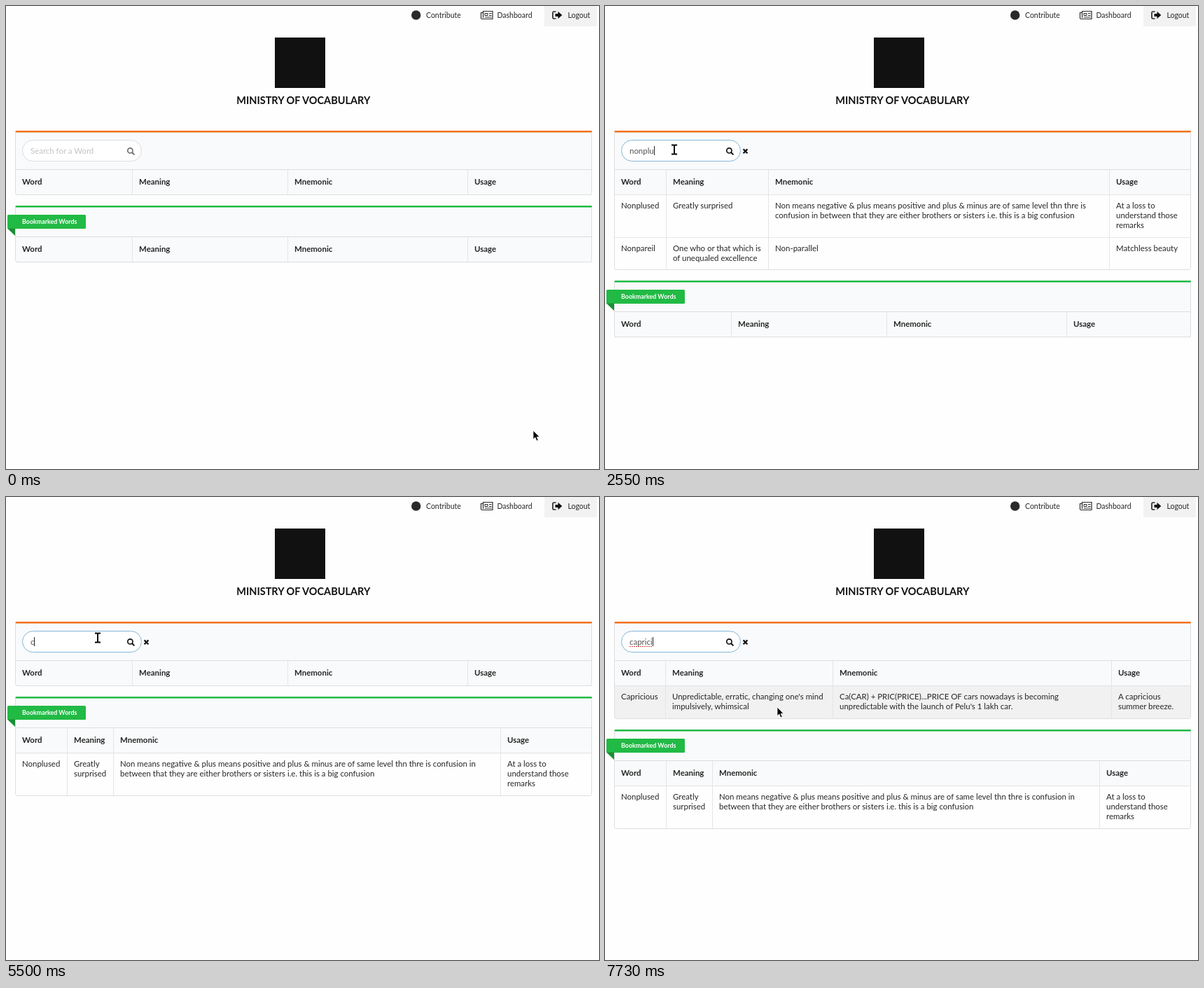
Write an HTML page that moves like this. It is 847x661 px and loops after 8000 ms.

```html
<!DOCTYPE html>
<html lang="en">
<head>
<meta charset="utf-8">
<title>Vocabulary search</title>
<style>
html, body { margin: 0; width: 100%; height: 100%; overflow: hidden; background: #fefefe; }
svg { display: block; width: 100%; height: 100%; }
text { font-family: Lato, "Open Sans", sans-serif; font-size: 11.45px; fill: #262626; white-space: pre; }
.b { font-weight: 700; }
.nav { font-size: 10.5px; }
.ribbon { font-size: 8.9px; font-weight: 700; fill: #fff; }
.title { font-size: 14.5px; font-weight: 700; fill: #111; text-anchor: middle; }
</style>
</head>
<body>
<svg viewBox="0 0 847 661">
  <g id="page"></g>
  <g id="field">
    <rect id="pill" x="23.5" y="191.5" width="170" height="30" rx="15" fill="#fff"/>
    <text id="query" x="35" y="211"></text>
    <path id="squiggle" d="M35 213.5H68" stroke="#d8453c" stroke-dasharray="2 1" fill="none"/>
    <rect id="caret" y="200" width="1" height="13" fill="#222"/>
    <g id="lens" fill="none" stroke="#111" stroke-width="1.7">
      <circle cx="177.4" cy="206.4" r="3.6"/><path d="M180 209L183.4 212.4" stroke-width="2"/>
    </g>
    <path id="clear" d="M197.6 204.4L203.4 210.2M203.4 204.4L197.6 210.2" stroke="#111" stroke-width="2.2"/>
  </g>
  <g id="pointer">
    <circle id="glow" cx="1" cy="1" r="9" fill="#fbf04a" fill-opacity=".8"/>
    <path id="arrow" d="M0 0V12.6L2.9 9.9L4.9 14.8L7.2 13.9L5.2 9.2H9Z" fill="#000" stroke="#fff" stroke-width=".8"/>
    <path id="beam" d="M-4-6.5H-1L0-5.5L1-6.5H4M0-6V6M-4 6.5H-1L0 5.5L1 6.5H4" fill="none" stroke="#000" stroke-width="1.9"/>
  </g>
</svg>
<script>
const LOOP = 8000;
const $ = id => document.getElementById(id);
const HEADS = ["Word", "Meaning", "Mnemonic", "Usage"];

// Cells are split by "#", lines inside a cell by "|".
const rows = s => s.trim().split("\n").map(r => r.split("#").map(c => c.trim().split("|")));

const nRows = rows(`
Necrology#A list of persons who have died in a certain|place or time##
Nectarine#A variety of the peach##
Nestling#Recently hatched##She writes books for children
Non|Sequitur#A conclusion that does not follow from the|facts stated, irrelevant reply##
Nuance#A slight degree of difference in anything|perceptible to the sense of the mind#Nuance = new + ounce.. and ounce is a very small unit|for weight.. hence a very small difference..#Without understanding the finer|nuances you can't enjoy the humor
Neural#Pertaining to the nerves or nervous system##Nervous disease
Nihilism#No right or wrong ; the delusion that|everything is unreal#A NIHILISTIC person might choose to ANNIHILATE the|world.#
`);
const nonpRows = rows(`
Nonplused#Greatly surprised#Non means negative & plus means positive and plus & minus are of same level thn thre is|confusion in between that they are either brothers or sisters i.e. this is a big confusion#At a loss to|understand those|remarks
Nonpareil#One who or that which is|of unequaled excellence#Non-parallel#Matchless beauty
`);
const savedRows = rows(`
Nonplused#Greatly|surprised#Non means negative & plus means positive and plus & minus are of same level thn thre is confusion in|between that they are either brothers or sisters i.e. this is a big confusion#At a loss to|understand those|remarks
`);
const tallRows = [...rows(`
Nonplused#Greatly surprised#Non means negative & plus means positive and plus &|minus are of same level thn thre is confusion in between|that they are either brothers or sisters i.e. this is a|big confusion#At a loss to understand those|remarks
Nonpareil#One who or that which is|of unequaled excellence#Non-parallel#Matchless beauty
`), ...nRows];
const cRows = rows(`
Cacophony /|-Nous#A loud harsh or strident|noise##
Cajole#To impose on or dupe by|flattering speech#Remember, our bollywood actress, MIRVA, she is one of the most talkative, candid and|energetic actresses we have in the industry...why is she portraying that image??? Probably|she is doing this to bag a film or two from NITIN BELVO!!!#He palavered her|into going along
Canine#Characteristic of a dog#Canine is a big sharp tooth used for biting and dogs have sharp tooth so canine = dog like#
Capitulate#To surrender or stipulate|terms#CAPtain it's too late, we will have to surrender..#
Choleric#Easily provoked to anger#Cholera is a disease . When you are sick you get irritated and bad-tempered, you are|choleric. So choleric#Men of the|choleric type take|to kicking and|smashing
Clairvoyance#Intuitive sagacity or|perception#When you are able to hear voice of dead people clearly(clear+voice), you have got|exceptional insight#
Coagulate#To change into a clot or a|jelly, as by heat, by|chemical action, or by a|ferment#Dranvel - think about the "thick" paste#Coagulated blood
`);
const capRows = rows(`
Caprice#A whim#Ca(kya)+price...u say to shopkeeper "abey yeh kya u go on changing price."#He bought it on an|impulse
Capricious#Unpredictable, erratic, changing one's mind|impulsively, whimsical#Ca(CAR) + PRIC(PRICE)...PRICE OF cars nowadays is becoming|unpredictable with the launch of Pelu's 1 lakh car.#A capricious|summer breeze.
`);

const emptyCols = [180, 402, 659], savedCols = [87, 153, 706], capCols = [86, 325, 723];
const none = { cols: emptyCols, rows: [] };
const saved = { cols: savedCols, rows: savedRows };

// [start time, value]
const results = [
  [0, none],
  [1430, { cols: [85, 324, 621], rows: nRows }],
  [2080, { cols: [87, 320, 613], rows: tallRows, scroll: true }],
  [2550, { cols: [87, 233, 720], rows: nonpRows }],
  [2700, saved],
  [4720, none],
  [5580, { cols: [98, 251, 712], rows: cRows, scroll: true }],
  [6350, { cols: capCols, rows: capRows }],
  [7040, { cols: capCols, rows: capRows.slice(1) }]
];
const bookmarks = [[0, none], [3790, saved]];
const typed = [
  [0, ""], [1210, "n"], [1430, "no"], [1680, "non"], [2080, "nonp"], [2150, "nonpl"], [2230, "nonplu"],
  [4720, ""], [5500, "c"], [5650, "ca"], [5820, "cap"], [5960, "capr"], [6270, "capri"], [6420, "capric"], [6740, "caprici"]
];
const focus = [[0, false], [740, true], [3700, false], [5060, true]];
const caretOn = [[0, false], [740, true], [1070, false], [1210, true], [3020, false], [5060, true]];
const glow = [[0, false], [670, true], [740, false], [3660, true], [3780, false], [4560, true], [4715, false], [5010, true], [5090, false]];
const path = [
  [30, 753, 606], [690, 99, 205], [3120, 99, 205], [3650, 160, 296], [3900, 160, 296], [4540, 201, 204],
  [4650, 201, 204], [4720, 184, 204], [5000, 131, 201], [7000, 131, 201], [7700, 246, 300]
];

const at = (track, t) => track.reduce((v, k) => t >= k[0] ? k[1] : v, null);
const snap = y => Math.floor(y + .4);
const esc = s => s.replace(/&/g, "&amp;").replace(/</g, "&lt;");
const text = (x, y, s, cls = "") => `<text x="${x}" y="${y}" class="${cls}">${esc(s)}</text>`;
const rect = (x, y, w, h, fill, more = "") => `<rect x="${x}" y="${y}" width="${w}" height="${h}" fill="${fill}" ${more}/>`;
const line = (d, color) => `<path d="${d}" stroke="${color}" fill="none"/>`;
const rowHeight = r => 18.75 + 14 * Math.max(...r.map(c => c.length));

function pointerAt(t) {
  let i = path.findIndex(k => k[0] > t);
  if (i === 0) return path[0].slice(1);
  if (i < 0) return path[path.length - 1].slice(1);
  const a = path[i - 1], b = path[i], u = (t - a[0]) / (b[0] - a[0]), e = u * u * (3 - 2 * u);
  return [a[1] + (b[1] - a[1]) * e, a[2] + (b[2] - a[2]) * e];
}

function table(top, headH, color, view, right, mouseY) {
  const headTop = top + headH, bodyTop = headTop + 36;
  const xs = [23, ...view.cols.map(c => c + 10)];
  const bottom = bodyTop + view.rows.reduce((h, r) => h + rowHeight(r), 0);
  const end = snap(bottom), w = right - 13.5;
  let out = rect(13.5, top + 1, w, end - top - .5, "#fefefe", `rx="3"`) +
    rect(14, top + 2, w - 1, bodyTop - top - 2, "#f9fafb");
  let y = bodyTop;
  view.rows.forEach((r, i) => {
    const y0 = snap(y), y1 = snap(y += rowHeight(r));
    if (mouseY >= y0 && mouseY < y1) out += rect(14, y0 + 1, w - 1, y1 - y0 - 1, "#f1f1f1");
    if (i) out += line(`M14 ${y0 + .5}H${right}`, "#e7e7e8");
    r.forEach((cell, c) => cell.forEach((s, n) => { if (s) out += text(xs[c], y0 + 20 + 14 * n, s); }));
  });
  view.cols.forEach(c => out += line(`M${c + .5} ${headTop + 1}V${end}`, "#e4e5e6"));
  out += line(`M14 ${headTop + .5}H${right}`, "#dcddde") + line(`M14 ${bodyTop + .5}H${right}`, "#e2e3e4");
  out += rect(13.5, top + 1, w, end - top - .5, "none", `rx="3" stroke="#dddedf"`);
  out += rect(13.5, top, w + .5, 2.6, color, `rx="1.3"`);
  HEADS.forEach((s, c) => out += text(xs[c], headTop + 22, s, "b"));
  return { out, bottom };
}

function header(dx) {
  const ink = `fill="none" stroke="#2a2a2a"`;
  return `<g transform="translate(${-dx})">` +
    rect(769, 0, 75, 29, "#f2f2f2") +
    `<circle cx="585.7" cy="13" r="6.7" fill="#2a2a2a"/>` +
    `<path d="M681.5 7.5H695V18.5H680Q678.5 18.5 678.5 17V9.5H681.5ZM681.5 9.5V17" ${ink} stroke-width="1.2"/>` +
    `<path d="M684 10.5H688V13.5H684ZM690 10.5H693.5M690 13.5H693.5M684 16H693.5" ${ink}/>` +
    `<path d="M785.5 8H782.5Q781 8 781 9.5V16.5Q781 18 782.5 18H785.5" ${ink} stroke-width="1.7"/>` +
    `<path d="M784.5 11H788.5V7.8L794.3 13L788.5 18.2V15H784.5Z" fill="#111"/>` +
    text(600, 17, "Contribute", "nav") + text(701.5, 17, "Dashboard", "nav") + text(802.5, 17, "Logout", "nav") +
    `</g><g transform="translate(${-dx / 2})">` +
    rect(384, 45, 72, 72, "#111") + text(424.8, 140, "MINISTRY OF VOCABULARY", "title") + `</g>`;
}

function ribbon(y) {
  return rect(2, y, 112, 20, "#21ba45", `rx="1.5"`) +
    `<path d="M2 ${y + 19.5}H13V${y + 30}Z" fill="#198f35"/>` + text(23, y + 13, "Bookmarked Words", "ribbon");
}

const scrollbar = rect(842, 0, 5, 661, "#f3f3f3") + rect(843.5, 10, 3.5, 546, "#c1c1c1");

let lastPage = "";
const show = (id, on) => $(id).setAttribute("visibility", on ? "visible" : "hidden");

function draw(t) {
  const view = at(results, t), focused = at(focus, t), word = at(typed, t), [px, py] = pointerAt(t);
  const dx = view.scroll ? 13 : 0, right = 836.5 - dx;
  const main = table(178, 55, "#f2711c", view, right, py);
  const markTop = snap(main.bottom + 16);
  const marks = table(markTop, 44, "#21ba45", at(bookmarks, t), right, py);
  const page = header(dx) + main.out + marks.out + ribbon(markTop + 13) + (dx ? scrollbar : "");
  if (page !== lastPage) $("page").innerHTML = lastPage = page;

  $("pill").setAttribute("stroke", focused ? "#85b7d9" : "#dcddde");
  $("lens").setAttribute("opacity", focused ? 1 : .6);
  const query = $("query");
  query.textContent = word || "Search for a Word";
  query.style.fill = word ? (focused ? "#555" : "#333") : (focused ? "#8c8c8c" : "#c3c3c3");
  $("caret").setAttribute("x", Math.round(35 + (word ? query.getComputedTextLength() : 0)));
  show("caret", at(caretOn, t));
  show("clear", word);
  show("squiggle", t >= 7400);

  const inField = px > 23 && px < 194 && py > 191 && py < 222;
  $("pointer").setAttribute("transform", `translate(${px} ${py})`);
  show("arrow", !inField);
  show("beam", inField);
  show("glow", at(glow, t));
}

const start = performance.now();
function tick() {
  draw((performance.now() - start) % LOOP);
  requestAnimationFrame(tick);
}
draw(0);
requestAnimationFrame(tick);
</script>
</body>
</html>
```
